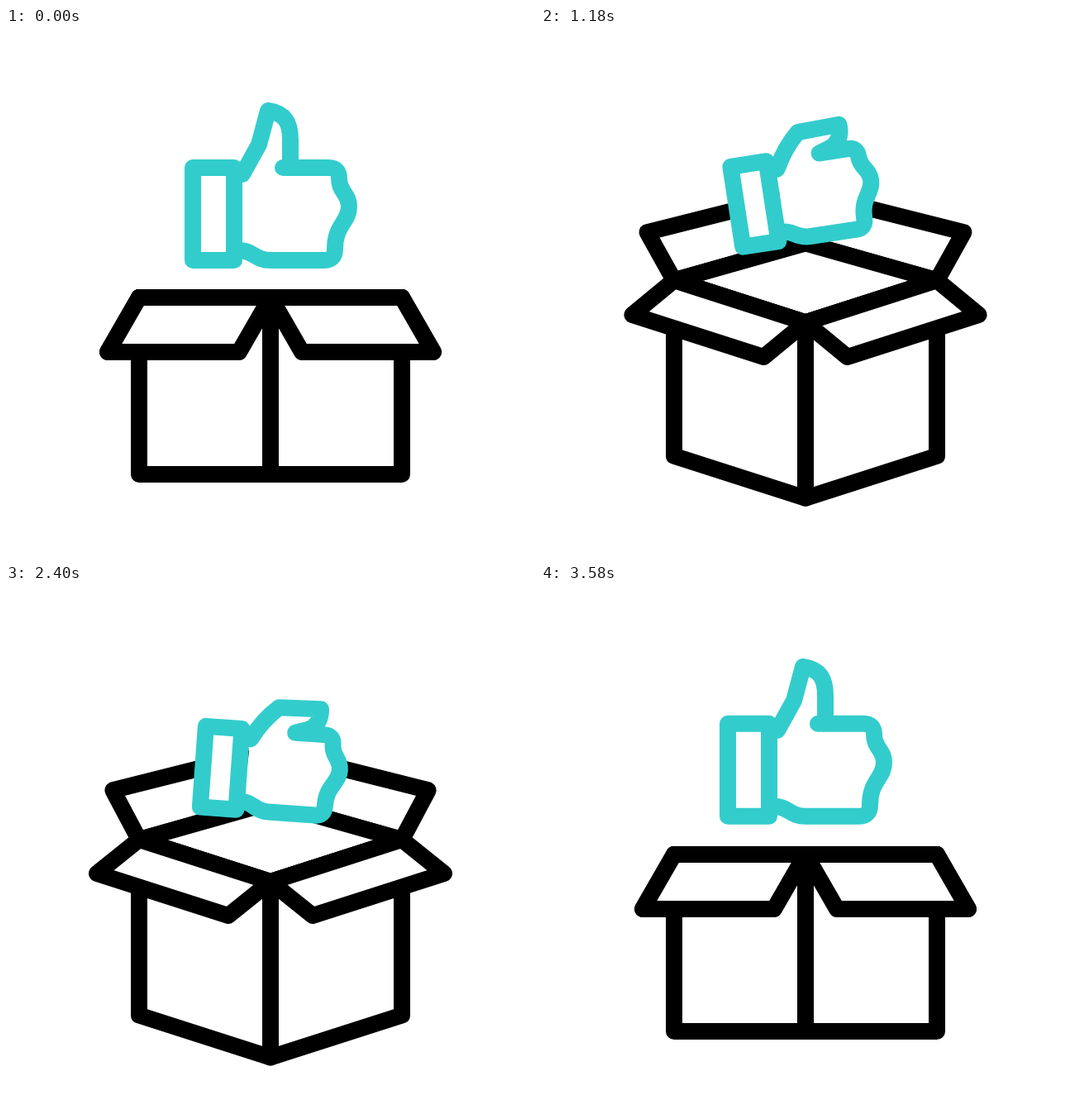
Animation, 640 px wide and 640 px high, one loop 3600 ms. Source, as an HTML page with a canvas:

```html
<!DOCTYPE html>
<html lang="en">
<head>
<meta charset="utf-8">
<title>Open box with thumbs up</title>
<style>
  html, body { margin: 0; width: 100%; height: 100%; overflow: hidden; background: #fff; }
  canvas { display: block; width: 640px; height: 640px; }
</style>
</head>
<body>
<canvas id="stage" width="640" height="640"></canvas>
<script>
const ctx = document.getElementById('stage').getContext('2d');
const LOOP = 3600;
const LINE = 20;
const TEAL = '#33cccc';
const HOP = 44;
// The box is on the ground and at the top of a hop by turns.
const hopBeats = [980, 1380, 1725, 2180, 2590, 3000, 3400];

const clamp = (v, lo, hi) => Math.min(hi, Math.max(lo, v));
const mix = (a, b, k) => a + (b - a) * k;

function ramp(t, from, to) {
  const k = clamp((t - from) / (to - from), 0, 1);
  return k * k * (3 - 2 * k);
}

// Smooth pulse with a broad top
function pulse(t, center, reach) {
  const u = clamp((t - center) / reach, -1, 1);
  return (1 - u ** 4) ** 2;
}

const opening = t => ramp(t, 220, 1010) - ramp(t, 2775, 3270);

function hopHeight(t) {
  let height = 0;
  for (let i = 1; i < hopBeats.length; i++) {
    height += (i % 2 ? HOP : -HOP) * ramp(t, hopBeats[i - 1], hopBeats[i]);
  }
  return height;
}

// How far the flaps are thrown up as the box comes down
const flapSwing = t =>
  0.5 * pulse(t, 1010, 290) + pulse(t, 1810, 250) + 0.5 * pulse(t, 2630, 430);

function polygon(points) {
  ctx.beginPath();
  points.forEach(([x, y]) => ctx.lineTo(x, y));
  ctx.closePath();
  ctx.fill();
  ctx.stroke();
}

function mirrored(draw) {
  draw();
  ctx.save();
  ctx.translate(640, 0);
  ctx.scale(-1, 1);
  draw();
  ctx.restore();
}

function drawBox(t, open) {
  const swing = flapSwing(t);
  const unfold = ramp(t, 760, 1010) - ramp(t, 2860, 3270);
  const fx = mix(-38, -46, open) - 12 * swing;
  const fy = mix(66, 49, unfold) - 19 * swing;
  const bx = mix(-38, -41, open) + 22 * swing;
  const by = mix(66, -42, open) - 42 * swing;

  const dy = -hopHeight(t) * open;
  const depth = 51 * open;
  const rim = 326 + 1.5 * open + dy;
  const base = 540 + dy;
  const front = rim + depth;
  const back = rim - 45 * open ** 1.5;

  ctx.strokeStyle = '#000';
  ctx.lineWidth = LINE;
  mirrored(() => polygon([
    [161, rim], [161 + bx, rim + by], [320 + bx, back + by + 5 * open], [320, back]
  ]));
  polygon([[161, rim], [320, back], [479, rim], [320, front]]);
  mirrored(() => polygon([[161, rim], [320, front], [320, base + depth], [161, base]]));
  mirrored(() => polygon([[161, rim], [320, front], [320 + fx, front + fy], [161 + fx, rim + fy]]));
}

// The thumb folds over the fist as bend goes from 0 to 1.
function tracePalm(bend) {
  const m = (a, b) => mix(a, b, bend);
  const arc = 24 * bend * (1 - bend);
  ctx.beginPath();
  ctx.moveTo(m(286, 289), m(177, 182));
  ctx.quadraticCurveTo(m(296, 304), m(159, 154), m(306, 325), m(141, 136));
  ctx.lineTo(m(317, 383), m(100, 134) - arc);
  ctx.bezierCurveTo(m(338, 384), m(103, 150) - arc, m(344, 378), m(115, 160),
                    m(344, 366), m(135, 164));
  ctx.lineTo(m(344, 350), 169);
  ctx.lineTo(m(335, 351), 169);
  ctx.lineTo(390, 169);
  ctx.quadraticCurveTo(403, 169, 403, 182);
  ctx.bezierCurveTo(403, 199, 415, 200, 415, 216);
  ctx.bezierCurveTo(415, 235, 398, 238, 398, 267);
  ctx.quadraticCurveTo(398, 281, 385, 281);
  ctx.lineTo(320, 281);
  ctx.bezierCurveTo(302, 281, 299, 270, 284, 269);
}

function drawHand(t, open) {
  const beat = (clamp(t, 940, 2940) - 940) / 800;
  const raise = (1 - Math.cos(beat * 2 * Math.PI)) / 2;
  const leave = ramp(t, 2940, 3400);
  const engaged = ramp(t, 220, 940) - leave;
  const leap = 48 * (leave - ramp(t, 3400, 3600));
  const x = mix(320, mix(324, 313, raise), engaged);
  const y = mix(215, mix(232, 176, raise), engaged) - leap;
  const angle = mix(13, -20, raise) * engaged * open;
  const size = 1 - 0.125 * open;

  ctx.save();
  ctx.translate(x, y);
  ctx.rotate(angle * Math.PI / 180);
  ctx.scale(size, size);
  ctx.translate(-320, -215);
  ctx.strokeStyle = TEAL;
  ctx.lineWidth = LINE / size;
  tracePalm(open);
  ctx.fill();
  ctx.stroke();
  polygon([[226, 169], [276, 169], [276, 281], [226, 281]]);
  ctx.restore();
}

function render(now) {
  const t = now % LOOP;
  const open = opening(t);
  ctx.fillStyle = '#fff';
  ctx.fillRect(0, 0, 640, 640);
  ctx.lineCap = ctx.lineJoin = 'round';
  drawBox(t, open);
  drawHand(t, open);
}

const start = performance.now();
function tick() {
  render(performance.now() - start);
  requestAnimationFrame(tick);
}
tick();
</script>
</body>
</html>
```
